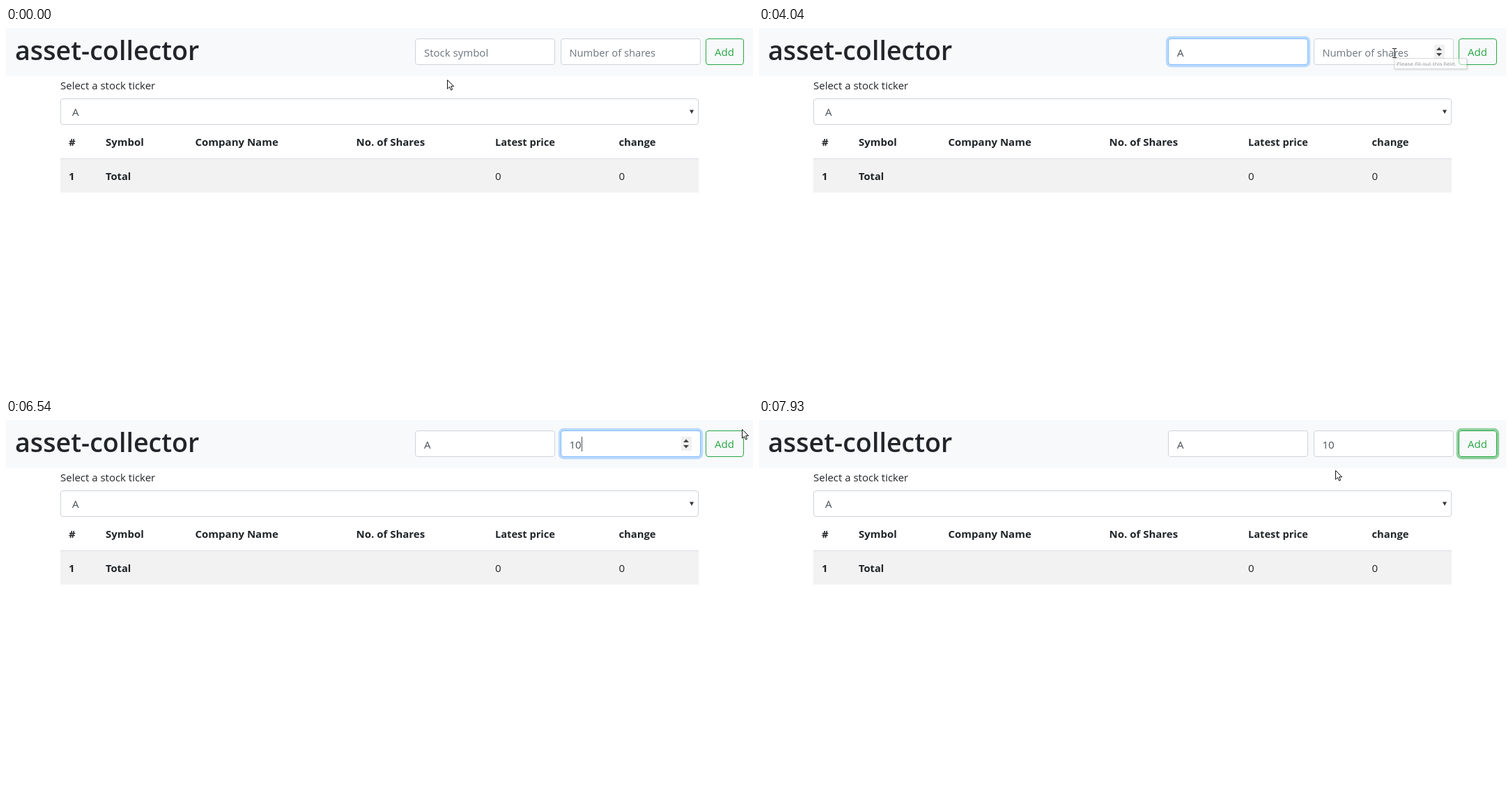
Recreate the animation shown at these times as an HTML page. Size 1072 px wide and 522 px high, loop 8000 ms.

```html
<!DOCTYPE html>
<html lang="en">
<head>
<meta charset="utf-8">
<title>Portfolio form</title>
<style>
  html, body { margin: 0; width: 100%; height: 100%; overflow: hidden; background: #fff; }
  svg { display: block; width: 100vw; height: 100vh; }
  text { font: 15px "Open Sans", "Noto Sans", sans-serif; fill: #212529; white-space: pre; }
  .title { font-size: 37.7px; font-weight: 600; }
  .bold text { font-weight: 700; }
  .value { fill: #495057; }
  .hint { fill: #6c757d; }
  .box { fill: #fff; stroke: #ced4da; }
  .focus { fill: none; opacity: 0; }
  .focus .ring { stroke: #007bff; stroke-opacity: .25; stroke-width: 3.2; }
  .focus .edge { stroke: #80bdff; }
  .cursor { fill: #fff; stroke: #111; stroke-width: 1; stroke-linejoin: round; }
  #tip text { font-size: 8px; fill: #575757; }
</style>
</head>
<body>
<svg viewBox="0 0 1072 522">
  <defs>
    <rect id="frame" x="587.5" y="15.5" width="200" height="37" rx="3.5"/>
    <rect id="halo" x="585.4" y="13.4" width="204.2" height="41.2" rx="5.6"/>
  </defs>
  <rect width="1072" height="69" fill="#f8f9fa"/>
  <text class="title" x="13" y="46">asset-collector</text>

  <g>
    <use href="#frame" class="box"/>
    <g class="focus" id="focusSymbol">
      <use href="#halo" class="ring"/>
      <use href="#frame" class="edge"/>
    </g>
    <text class="hint" id="hintSymbol" x="600" y="41">Stock symbol</text>
    <text class="value" id="symbol" x="600" y="41">A</text>
  </g>

  <g transform="translate(209)">
    <use href="#frame" class="box"/>
    <g class="focus" id="focusShares">
      <use href="#halo" class="ring"/>
      <use href="#frame" class="edge"/>
    </g>
    <text class="hint" id="hintShares" x="599.5" y="41" style="font-size:14.7px">Number of shares</text>
    <text class="value" id="shares" x="599.5" y="41">10</text>
    <g id="spinner">
      <rect x="760" y="24" width="15" height="20" fill="#f0f0f0"/>
      <path d="M763 32l4-4.5 4 4.5zM763 36h8l-4 4.5z" fill="#444"/>
    </g>
  </g>

  <rect id="buttonRing" x="1002.4" y="13.4" width="58.2" height="41.2" rx="5.6"
        fill="none" stroke="#28a745" stroke-opacity=".5" stroke-width="3.2"/>
  <rect id="button" x="1004.5" y="15.5" width="54" height="37" rx="3.5" fill="#28a745" stroke="#28a745"/>
  <text id="buttonText" x="1017" y="40">Add</text>

  <text x="78" y="88">Select a stock ticker</text>
  <rect class="box" x="78.5" y="101.5" width="915" height="37" rx="3.5"/>
  <text class="value" x="95" y="126">A</text>
  <path d="M981 117.5h6l-3 5.5z" fill="#333"/>

  <rect x="78" y="187" width="916" height="1" fill="#d8dce0"/>
  <rect x="78" y="188" width="916" height="48" fill="#f2f2f2"/>
  <g class="bold">
    <text x="90" y="169">#</text>
    <text x="143" y="169">Symbol</text>
    <text x="271.5" y="169">Company Name</text>
    <text x="502.5" y="169">No. of Shares</text>
    <text x="702" y="169" style="font-size:14.6px">Latest price</text>
    <text x="879.5" y="169" style="font-size:14.8px">change</text>
    <text x="90" y="218">1</text>
    <text x="143" y="218" style="font-size:14.7px">Total</text>
  </g>
  <text x="702" y="218">0</text>
  <text x="879.5" y="218">0</text>

  <rect id="caret" y="24" width="1" height="21" fill="#495057"/>
  <g id="tip">
    <rect x="912" y="45" width="106" height="16" fill="#000" opacity=".12"/>
    <rect x="911.5" y="43.5" width="104" height="15" fill="#fff" stroke="#bbb"/>
    <text x="915" y="54">Please fill out this field.</text>
  </g>

  <g id="pointer" class="cursor">
    <path id="arrow" d="M.5.5v12.7l3-2.8 2.1 4.7 2-.9-2-4.5h4z"/>
    <path id="beam" fill="none" d="M-3-6.5h2.5l.5.5.5-.5h2.5M0-6v12M-3 6.5h2.5l.5-.5.5.5h2.5"/>
    <path id="hand" d="M0 11V2a1.5 1.5 0 0 1 3 0v5l5.5 1.3q1.5.5 1.5 2v3.5l-1.5 2.5v2.5h-7v-2.5L-3 10.8q-.5-2 1-2zM3 7v3.5M5.4 7.8v3M7.8 8.3v3"/>
  </g>
</svg>

<script>
  const LOOP = 8000, STEP = 75, BLINK = 550;
  const SYMBOL_FOCUS = 310, SYMBOL_TYPED = 2250;
  const SHARES_HOVER = 3580, SHARES_FOCUS = 4200, SHARES_TYPED = 5440;
  const BUTTON_HOVER = 6620, BUTTON_FOCUS = 6920, BUTTON_LEAVE = 7240;

  const el = Object.fromEntries([...document.querySelectorAll("[id]")].map(e => [e.id, e]));
  const show = (node, on) => node.setAttribute("visibility", on ? "visible" : "hidden");
  const clamp = k => Math.min(1, Math.max(0, k));
  const smooth = k => k * k * (3 - 2 * k);
  const mix = (a, b, k) => a + (b - a) * k;
  // Fades in at one time and out again at another.
  const pulse = (t, on, off = Infinity, fade = 150) =>
    clamp((t - on) / fade) - clamp((t - off) / fade);

  const home = { x: 633, y: 74 };
  const moves = [
    { start: 5, time: 300, x: 677, y: 35 },
    { start: 3350, time: 450, x: 912, y: 36 },
    { start: 6085, time: 305, x: 1068, y: 3 },
    { start: 6390, time: 390, x: 1032, y: 34 },
    { start: 7090, time: 375, x: 846, y: 82 },
    { start: 7630, time: 300, x: 827, y: 72 }
  ];

  // The pointer is sampled once per STEP, as in a screen recording.
  function pointerAt(t) {
    let pos = home;
    for (const move of moves) {
      if (t < move.start) break;
      const sampled = Math.floor((t - move.start) / STEP) * STEP;
      const k = smooth(clamp(sampled / move.time));
      pos = { x: mix(pos.x, move.x, k), y: mix(pos.y, move.y, k) };
    }
    return pos;
  }

  function cursorOver({ x, y }) {
    if (y < 15 || y > 53 || x < 587 || x > 1059) return "arrow";
    return x < 1000 ? "beam" : "hand";
  }

  // Focus and typing restart the blink.
  const carets = [
    { start: SYMBOL_FOCUS, x: 600 }, { start: 1320, x: 600 },
    { start: SYMBOL_TYPED, x: 610 }, { start: SHARES_FOCUS, x: 809 },
    { start: SHARES_TYPED, x: 826 }
  ];

  function drawCaret(t) {
    const caret = carets.findLast(c => c.start <= t);
    const lit = caret && t < BUTTON_FOCUS && (t - caret.start) % (2 * BLINK) < BLINK;
    show(el.caret, lit);
    if (lit) el.caret.setAttribute("x", caret.x);
  }

  function drawPointer(t) {
    const { x, y } = pointerAt(t);
    const shape = cursorOver(pointerAt(t - STEP)); // the shape lags one sample behind
    for (const name of ["arrow", "beam", "hand"]) show(el[name], name === shape);
    el.pointer.setAttribute("transform", `translate(${Math.round(x)} ${Math.round(y)})`);
  }

  function draw(t) {
    drawPointer(t);
    drawCaret(t);

    el.focusSymbol.style.opacity = pulse(t, SYMBOL_FOCUS, SHARES_FOCUS);
    el.focusShares.style.opacity = pulse(t, SHARES_FOCUS, BUTTON_FOCUS);
    el.buttonRing.style.opacity = pulse(t, BUTTON_FOCUS);
    el.tip.style.opacity = pulse(t, 3950, 4240, 170);

    const fill = pulse(t, BUTTON_HOVER, BUTTON_LEAVE);
    el.button.setAttribute("fill-opacity", fill);
    el.buttonText.style.fill = `rgb(${[40, 167, 69].map(c => mix(c, 255, fill))})`;

    show(el.hintSymbol, t < SYMBOL_TYPED);
    show(el.symbol, t >= SYMBOL_TYPED);
    show(el.hintShares, t < SHARES_TYPED);
    show(el.shares, t >= SHARES_TYPED);
    show(el.spinner, t >= SHARES_HOVER && t < BUTTON_FOCUS);
  }

  const start = performance.now();
  function tick() {
    draw((performance.now() - start) % LOOP);
    requestAnimationFrame(tick);
  }
  tick();
</script>
</body>
</html>
```
